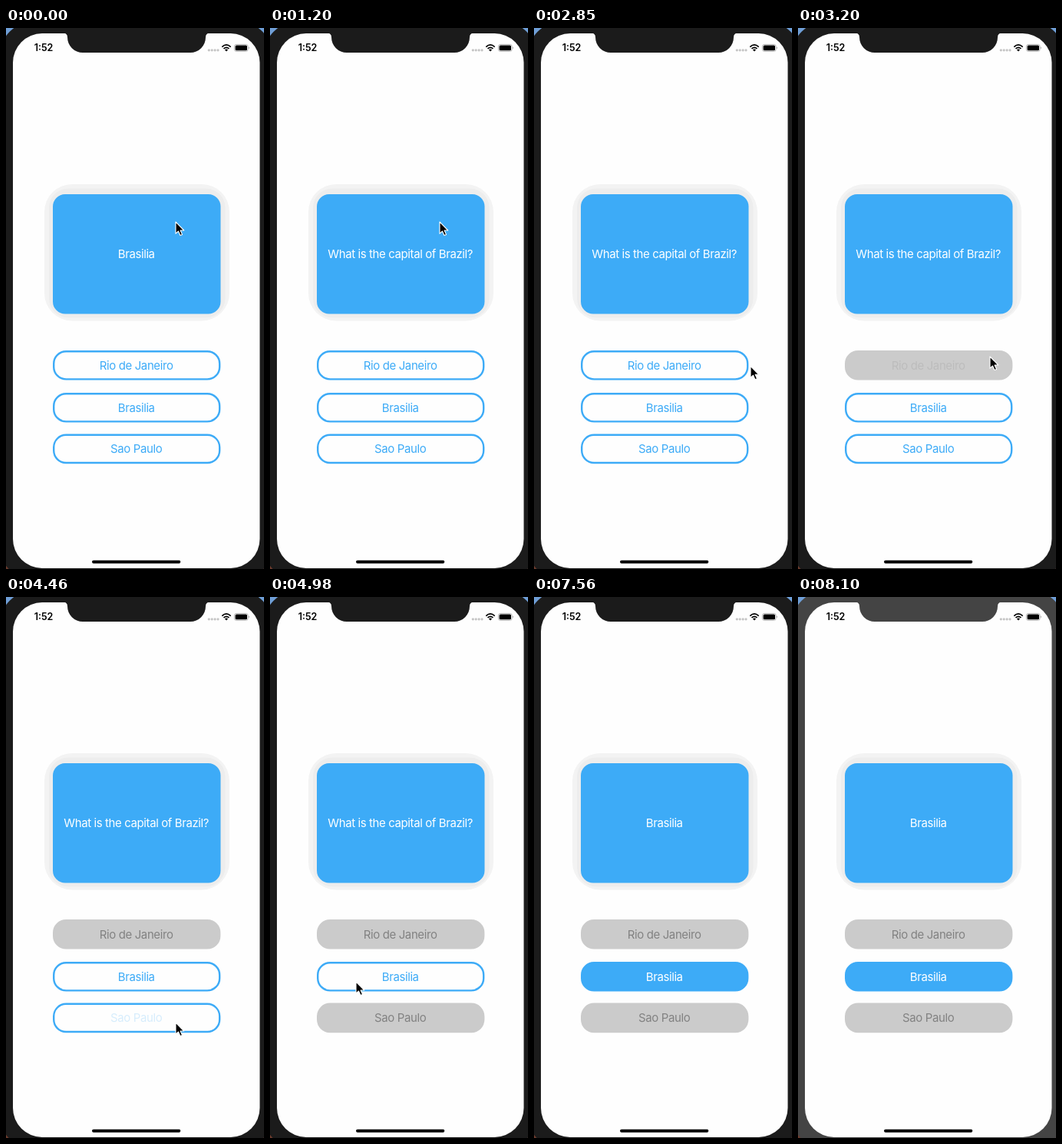
Animation of 336 by 703 pixels, one loop 8.2 s. Source, as an HTML page:

```html
<!DOCTYPE html>
<html lang="en">
<head>
<meta charset="utf-8">
<title>Capital quiz</title>
<style>
  html, body { margin: 0; width: 100%; height: 100%; overflow: hidden; }
  svg { display: block; width: 336px; height: 703px; }
  text { font: 15px Inter, Roboto, sans-serif; letter-spacing: -.4px; text-anchor: middle; }
  #clock { font-size: 12.5px; font-weight: 600; letter-spacing: 0; }
</style>
</head>
<body>
<svg viewBox="0 0 336 703">
  <defs>
    <linearGradient id="desk" x2="0" y2="1">
      <stop offset="0" stop-color="#6f9fd8"/>
      <stop offset="1" stop-color="#6b3a2c"/>
    </linearGradient>
  </defs>
  <rect width="336" height="703" fill="url(#desk)"/>
  <g id="bezel" fill="#1b1b1b">
    <rect x="-11" y="-11" width="361" height="731" rx="54"/>
    <rect x="9" y="7" width="321.500" height="695" rx="38" fill="#fefefe"/>
    <path d="M75 6.500Q80 7 80 12A20 20 0 0 0 100 32H240A20 20 0 0 0 260 12Q260 7 265 6.500Z"/>
  </g>

  <text id="clock" x="49" y="30.300">1:52</text>
  <g fill="#c4c4c4">
    <circle cx="264.300" cy="28.800" r="1.600"/><circle cx="268.200" cy="28.800" r="1.600"/>
    <circle cx="272.100" cy="28.800" r="1.600"/><circle cx="276" cy="28.800" r="1.600"/>
  </g>
  <path d="M281.300 24.600Q287 19.200 292.700 24.600M283.500 26.900Q287 23.700 290.500 26.900" fill="none" stroke="#000" stroke-width="1.700"/>
  <path d="M284.900 28.300Q287 26.600 289.100 28.300L287 30.400Z"/>
  <rect x="297.400" y="21.400" width="17.800" height="9" rx="2.600" fill="none" stroke="#aaa" stroke-width=".8"/>
  <rect x="298.600" y="22.600" width="15.400" height="6.600" rx="1.500"/>
  <path d="M316.200 24.300q1.600 1.600 0 3.200z" fill="#888"/>
  <rect x="112" y="691.700" width="115.300" height="4" rx="2"/>

  <rect x="50" y="203" width="241" height="177.500" rx="36" fill="#f3f3f3"/>
  <rect x="56" y="208.500" width="229.500" height="168" rx="25" fill="#ededed"/>
  <rect x="61" y="216" width="218.500" height="155.500" rx="16" fill="#3dabf7"/>
  <text id="card" x="169.700" y="299.200" fill="#fff"></text>
  <g id="answers"></g>
  <path id="cursor" d="M0 0V15.200L3.500 12L5.900 17.500L8.500 16.400L6.100 11H10.800Z" stroke="#fff" stroke-width="1.100" stroke-linejoin="round"/>
</svg>
<script>
const LOOP = 8200, BLUE = '#3dabf7', GRAY = '#cbcbcb';
const $ = id => document.getElementById(id);
const clamp = v => Math.max(0, Math.min(1, v));
const smooth = v => v * v * (3 - 2 * v);

// Each answer is pressed, then released into its result colours.
const answers = [
  { label: 'Rio de Janeiro', y: 419, down: 3140, up: 3190, fill: GRAY, ink: '#828282' },
  { label: 'Brasilia', y: 474, down: 5510, up: 5690, fill: BLUE, ink: '#fff' },
  { label: 'Sao Paulo', y: 527.6, down: 4460, up: 4570, fill: GRAY, ink: '#828282' }
];

// Cursor moves: start, end and the points of a cubic curve.
const moves = [
  { from: 1900, to: 2440, pts: [[221, 252], [267, 233], [314, 214], [360, 195]] },
  { from: 2640, to: 2980, pts: [[345, 405], [315, 442], [283, 449], [250, 427]] },
  { from: 3210, to: 3920, pts: [[250, 427], [340, 450], [305, 616], [221, 553]] },
  { from: 4500, to: 4980, pts: [[221, 553], [185, 535], [148, 518], [112, 500]] },
  { from: 7000, to: 7550, pts: [[112, 500], [165, 559], [219, 619], [273, 678]] }
];

function add(parent, tag, attrs) {
  const node = document.createElementNS('http://www.w3.org/2000/svg', tag);
  for (const key in attrs) node.setAttribute(key, attrs[key]);
  return parent.appendChild(node);
}

for (const a of answers) {
  a.box = add($('answers'), 'rect', {
    x: 62.2, y: a.y + 1.2, width: 216, height: 36.2, rx: 16, 'stroke-width': 2.4
  });
  a.text = add($('answers'), 'text', { x: 169.7, y: a.y + 24.7 });
  a.text.textContent = a.label;
}

function drawAnswer(a, t) {
  const done = t >= a.up;
  a.box.setAttribute('fill', done ? a.fill : '#fefefe');
  a.box.setAttribute('stroke', done ? a.fill : BLUE);
  a.text.setAttribute('fill', done ? a.ink : BLUE);
  const alpha = t < a.down ? 1 : .2 + .8 * smooth(clamp((t - a.up) / 350));
  a.text.setAttribute('opacity', alpha);
}

function cursorAt(t) {
  const move = moves.filter(m => t >= m.from).pop() || moves[0];
  const u = smooth(clamp((t - move.from) / (move.to - move.from))), v = 1 - u;
  const weights = [v * v * v, 3 * v * v * u, 3 * v * u * u, u * u * u];
  return [0, 1].map(axis => move.pts.reduce((sum, p, i) => sum + p[axis] * weights[i], 0));
}

function draw(t) {
  $('bezel').setAttribute('fill', t >= 8100 ? '#444' : '#1b1b1b');
  $('card').textContent = t >= 1200 && t < 5690 ? 'What is the capital of Brazil?' : 'Brasilia';
  for (const a of answers) drawAnswer(a, t);
  $('cursor').setAttribute('transform', `translate(${cursorAt(t)})`);
  $('cursor').setAttribute('visibility', t < 7550 ? 'visible' : 'hidden');
}

let start;
function tick(now) {
  start ??= now;
  draw((now - start) % LOOP);
  requestAnimationFrame(tick);
}
draw(0);
requestAnimationFrame(tick);
</script>
</body>
</html>
```
